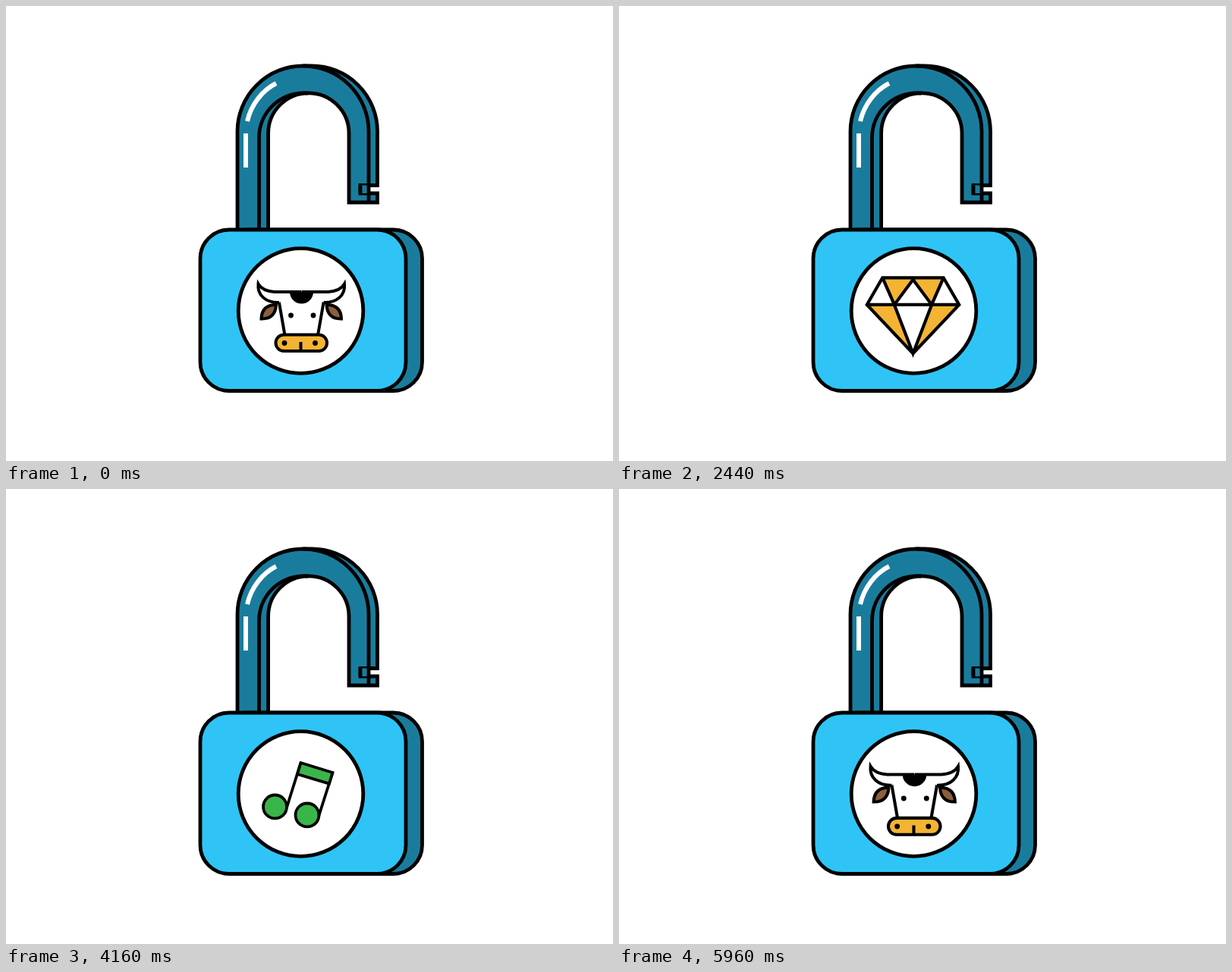
Write an HTML page that moves like this. It is 800 px wide and 600 px high and loops after 6 s.

```html
<!DOCTYPE html>
<html lang="en">
<head>
<meta charset="utf-8">
<title>Padlock</title>
<style>
html, body { margin: 0; width: 100%; height: 100%; overflow: hidden; background: #fff; }
svg { display: block; width: 100vw; height: 100vh; }
.teal { fill: #1a7c9c; }
.blue { fill: #2fc4f5; }
.gold { fill: #f3b433; }
.brown { fill: #8b5e3c; }
.orange { fill: #f6592b; }
.green { fill: #3ab54a; }
.white { fill: #fff; }
.black { fill: #000; stroke: none; }
</style>
</head>
<body>
<svg viewBox="0 0 800 600" fill="none" stroke="#000" stroke-width="4.8">
  <g id="shackle">
    <!-- back face, then front face -->
    <path class="teal" d="M305 300V165.5A86.5 86.5 0 0 1 391.5 79H403A86.5 86.5 0 0 1 489.5 165.5V236.5H467V247H489.5V259H452V168A53.2 53.2 0 0 0 345.6 168V300"/>
    <path class="teal" stroke="none" d="M467 236.5H478V247H467Z"/>
    <path d="M391.5 79A86.5 86.5 0 0 1 478 165.5V259M333.5 300V174A59 59 0 0 1 398.5 115M467 236.5V247"/>
    <path d="M316 168V213M318 152C323 130 338 111 356 102" stroke="#fff" stroke-width="6"/>
  </g>
  <rect class="teal" x="278" y="295" width="270.5" height="212.5" rx="38"/>
  <rect class="blue" x="256" y="295" width="271" height="212.5" rx="38"/>

  <g stroke-width="3">
    <path class="teal" d="M365 402L347.500 445H385L392 400"/>
    <circle class="teal" cx="375" cy="371.500" r="31.800"/>
    <path class="teal" stroke="none" d="M366 400L364 406H380V398Z"/>
    <path class="black" d="M376 400L359 446.500H414.500L395.500 400Z"/>
    <circle class="black" cx="386" cy="374" r="32"/>
  </g>

  <circle id="badge" class="white" cx="388.500" cy="402" r="82.300"/>

  <g id="bull" stroke-width="4">
    <path class="white" d="M357.500 377L367.500 434H411L421 377"/>
    <g id="side">
      <path class="brown" d="M356 394Q337 394 336.500 412.500Q355 413 356 394Z"/>
      <path class="white" d="M389 377H354Q338 376 332.500 366.500C331 381 342 391.500 360 391"/>
    </g>
    <use href="#side" transform="translate(778.500) scale(-1 1)"/>
    <path class="black" d="M374 377A15.500 15.500 0 0 0 405 377Z"/>
    <rect class="gold" x="355.500" y="433.500" width="67.500" height="21.500" rx="10.700"/>
    <path d="M388.500 443V455"/>
    <g class="black">
      <circle cx="375.500" cy="408" r="3.400"/>
      <circle cx="405" cy="408" r="3.400"/>
      <circle cx="367" cy="444.500" r="3.400"/>
      <circle cx="407.500" cy="444.500" r="3.400"/>
    </g>
  </g>

  <g id="card" stroke-width="3.6">
    <rect class="white" x="332" y="371" width="107" height="60"/>
    <path class="orange" d="M343 420V417.500A12.700 12.700 0 0 1 368.500 417.500V420"/>
    <circle class="orange" cx="355.700" cy="397" r="7"/>
    <rect x="341" y="381.500" width="31" height="38.500"/>
    <path d="M381 392H408M381 409.500H429"/>
  </g>

  <g id="diamond">
    <path class="white" stroke="none" d="M347.500 358.500H427.500L448 394L387.500 458L327 394Z"/>
    <path class="gold" stroke="none" d="M347.500 358.500H387.500L363 394ZM427.500 358.500H387.500L412 394ZM327 394H363L387.500 458ZM448 394H412L387.500 458Z"/>
    <path stroke-width="4.200" d="M347.500 358.500H427.500L448 394L387.500 458L327 394ZM327 394H448M347.500 358.500L363 394L387.500 361L412 394L427.500 358.500M363 394L387.500 458L412 394"/>
  </g>

  <g id="notes" stroke-width="3.800">
    <path d="M370 420L388.500 361M412 432L430.500 374"/>
    <path class="green" d="M388.500 361L430.500 374L426 388.500L384 376Z"/>
    <circle class="green" cx="354.500" cy="419" r="15.500"/>
    <circle class="green" cx="397" cy="430" r="15.500"/>
  </g>
</svg>
<script>
const LOOP = 6000;
const el = id => document.getElementById(id);
const clamp = x => Math.min(1, Math.max(0, x));
const ramp = (t, a, b) => clamp((t - a) / (b - a));
const sine = p => (1 - Math.cos(Math.PI * p)) / 2;
const cubic = p => p < .5 ? 4 * p ** 3 : 1 - 4 * (1 - p) ** 3;

// p runs from full size (0) through a small swell to nothing (1)
function pop(p, peak = 1.07, power = 3) {
  const swell = .375;
  return p < swell
    ? 1 + (peak - 1) * sine(p / swell)
    : peak * (1 - ((p - swell) / (1 - swell)) ** power);
}

const icons = [
  { id: "bull", x: 389, y: 410, enter: [5680, 6000], leave: [960, 1280] },
  { id: "card", x: 385.5, y: 401, enter: [1280, 1600], leave: [1880, 2280] },
  { id: "diamond", x: 387.5, y: 408, enter: [2320, 2640], leave: [2960, 3280] },
  { id: "notes", x: 385, y: 410, enter: [3280, 3600], leave: [3960, 4280], peak: 1.2, power: 2 }
];

function iconScale({ enter, leave, peak, power }, t) {
  const wraps = enter[0] > leave[0];
  const entering = t >= enter[0];
  const leaving = t >= leave[0];
  if (entering && (wraps || !leaving)) return pop(1 - ramp(t, ...enter), peak, power);
  if (leaving || wraps) return pop(ramp(t, ...leave));
  return 0;
}

function setScale(id, x, y, s) {
  const node = el(id);
  node.style.display = s > .002 ? "" : "none";
  node.setAttribute("transform", `translate(${x} ${y}) scale(${s}) translate(${-x} ${-y})`);
}

function draw(now) {
  const t = now % LOOP;
  for (const icon of icons) setScale(icon.id, icon.x, icon.y, iconScale(icon, t));
  const closed = cubic(ramp(t, 4160, 4560)) - cubic(ramp(t, 5480, 5880));
  el("shackle").setAttribute("transform", `translate(0 ${70 * closed})`);
  const hidden = cubic(ramp(t, 4200, 4440)) - cubic(ramp(t, 5560, 5800));
  setScale("badge", 388.5, 402, 1 - hidden);
  requestAnimationFrame(draw);
}
draw(performance.now());
</script>
</body>
</html>
```
